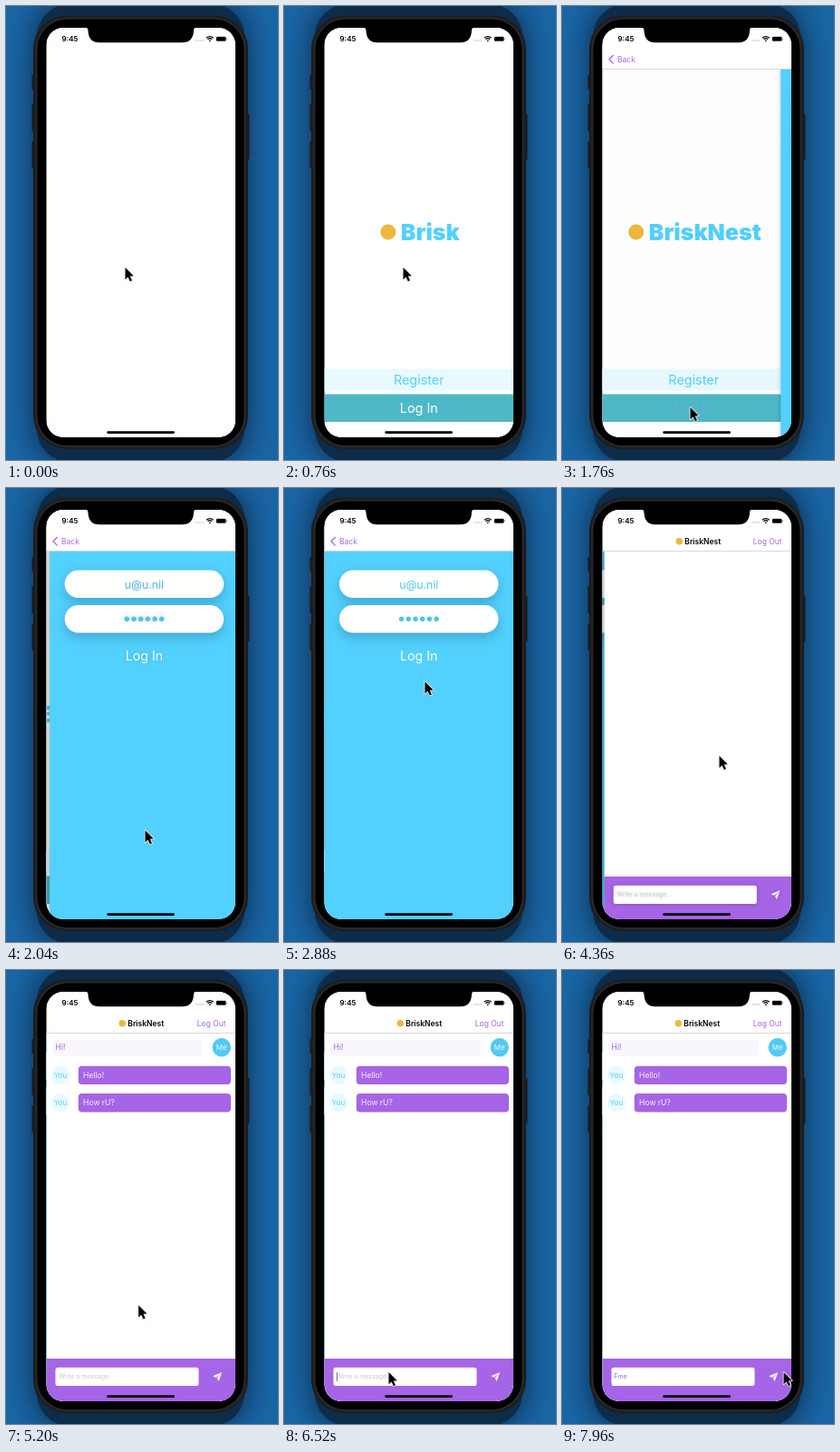
An HTML page with a canvas for the animation above (8 s loop, 300 by 500 pixels).

```html
<!DOCTYPE html>
<html lang="en">
<head>
<meta charset="utf-8">
<title>Chat app demo</title>
<style>
  html, body { margin: 0; width: 100%; height: 100%; overflow: hidden; background: #1a64a4; }
  canvas { display: block; width: 300px; height: 500px; }
</style>
</head>
<body>
<canvas id="stage"></canvas>
<script>
const LOOP = 8000;
const NAME = 'BriskNest';
const EMAIL = 'u@u.nil';
const BLUE = '#53d1fe', PURPLE = '#a664e6', GOLD = '#edb83c';
const SCREEN = { x: 44.5, y: 24, w: 208.5, h: 451 };
const MID = SCREEN.x + SCREEN.w / 2;

const canvas = document.getElementById('stage');
const ratio = window.devicePixelRatio || 1;
canvas.width = 300 * ratio;
canvas.height = 500 * ratio;
const ctx = canvas.getContext('2d');
ctx.scale(ratio, ratio);

const clamp = v => Math.max(0, Math.min(1, v));
const ramp = (t, from, to) => clamp((t - from) / (to - from));
const smooth = p => p * p * (3 - 2 * p);

// Remaining share of a critically damped navigation slide.
function slideLeft(t, start) {
  const x = Math.max(0, t - start) * 0.02;
  return x > 10 ? 0 : (1 + x) * Math.exp(-x);
}

function rect(x, y, w, h, fill, r = 0) {
  ctx.beginPath();
  ctx.roundRect(x, y, w, h, r);
  ctx.fillStyle = fill;
  ctx.fill();
}

function circle(x, y, r, fill) {
  ctx.beginPath();
  ctx.arc(x, y, r, 0, Math.PI * 2);
  ctx.fillStyle = fill;
  ctx.fill();
}

function font(size, weight = 400) {
  ctx.font = `${weight} ${size}px Inter, sans-serif`;
}

function text(str, x, y, size, fill, weight = 400, align = 'left') {
  font(size, weight);
  ctx.textAlign = align;
  ctx.fillStyle = fill;
  ctx.fillText(str, x, y);
}

function polygon(points, fill) {
  ctx.beginPath();
  points.forEach(([x, y]) => ctx.lineTo(x, y));
  ctx.closePath();
  ctx.fillStyle = fill;
  ctx.fill();
}

function shadow(color, blur, dy = 0) {
  ctx.shadowColor = color;
  ctx.shadowBlur = blur * ratio;
  ctx.shadowOffsetY = dy * ratio;
}

function isolated(draw, dx = 0, alpha = 1) {
  ctx.save();
  ctx.translate(dx, 0);
  ctx.globalAlpha *= alpha;
  draw();
  ctx.restore();
}

function drawPhone() {
  rect(0, 0, 300, 500, '#1a66a6');
  isolated(() => {
    shadow('rgba(0,8,20,.72)', 34);
    rect(34, -2, 229, 504, '#0c2c4a', 36);
  });
  const button = '#1b1c1f';
  [[28.5, 76, 16], [28.5, 108, 30], [28.5, 149, 30], [265, 119, 50]]
    .forEach(([x, y, h]) => rect(x, y, 3.5, h, button, 1));
  rect(30, 10.5, 237, 477.5, '#1d1d1f', 37);
  rect(32.5, 12.5, 232, 473.5, '#29292b', 35);
  rect(34.5, 14.5, 228, 469.5, '#000', 33);
}

function drawNotch() {
  ctx.beginPath();
  ctx.moveTo(86, 23);
  ctx.quadraticCurveTo(90.5, 23.5, 90.5, 27);
  ctx.quadraticCurveTo(91, 40.3, 103, 40.3);
  ctx.lineTo(194, 40.3);
  ctx.quadraticCurveTo(206.5, 40.3, 207, 27);
  ctx.quadraticCurveTo(207, 23.5, 211, 23);
  ctx.closePath();
  ctx.fillStyle = '#000';
  ctx.fill();
}

function drawStatus() {
  text('9:45', 61.5, 39, 8, '#000', 600);
  for (let i = 0; i < 4; i++) circle(210 + i * 2.5, 38, 0.75, '#b5b5b5');
  ctx.strokeStyle = '#000';
  ctx.lineWidth = 1.3;
  for (const r of [3.2, 5.4]) {
    ctx.beginPath();
    ctx.arc(224.8, 39, r, -Math.PI * 0.75, -Math.PI * 0.25);
    ctx.stroke();
  }
  polygon([[224.8, 39.4], [223.5, 37.7], [226.1, 37.7]], '#000');
  rect(231.5, 33.4, 11.4, 5.6, '#aaa', 1.6);
  rect(232, 33.9, 10.4, 4.6, '#000', 1.2);
  rect(243.4, 35.2, 0.9, 2, '#999', 0.4);
}

function drawTitle(count) {
  if (count < 1) return;
  font(25, 900);
  const shown = NAME.slice(0, count - 1);
  const width = ctx.measureText(shown).width;
  const left = MID + 1 - (23 + width) / 2;
  circle(left + 9, 249, 8.5, GOLD);
  text(shown, left + 23, 258, 25, BLUE, 900);
}

function drawWelcome(t) {
  rect(SCREEN.x, SCREEN.y, SCREEN.w, SCREEN.h, '#fff');
  isolated(() => {
    drawTitle(Math.floor((t - 240) / 100) + 1);
    rect(SCREEN.x, 399.5, SCREEN.w, 24, '#e9faff');
    text('Register', MID, 416.5, 14.4, BLUE, 400, 'center');
    rect(SCREEN.x, 427.5, SCREEN.w, 30.5, '#4fb8c7');
    const pressed = t > 1620;
    text('Log In', MID, 447.5, 14.4, pressed ? 'rgba(110,178,212,.7)' : '#fff', 400, 'center');
  }, 0, ramp(t, 100, 320));
}

function drawLogin(t) {
  rect(SCREEN.x, 69, SCREEN.w, 407, BLUE);
  for (const y of [90.5, 129]) {
    isolated(() => {
      shadow('rgba(30,95,125,.36)', 13, 5);
      rect(61, y, 175.5, 30.5, '#fff', 15.2);
    });
  }
  text(EMAIL, MID, 111, 12.3, '#53c4ee', 400, 'center');
  for (let i = 0; i < 6; i++) circle(129.6 + i * 7.7, 144.3, 2.7, '#50c3ee');
  const press = t > 3080 && t < 3240 ? 0.3 : 1;
  isolated(() => text('Log In', MID, 190, 14.2, '#fff', 400, 'center'), 0, press);
}

function drawMessage(row, words, mine) {
  const y = 75.5 + row * 30.4;
  const avatarX = mine ? 237.8 : 60;
  circle(avatarX, y + 9.8, 10.2, mine ? '#52c9f5' : '#e9faff');
  text(mine ? 'Me' : 'You', avatarX, y + 12.9, 8, mine ? '#e9faff' : BLUE, 400, 'center');
  if (mine) rect(51, y + 1.5, 166, 18, '#f9f6fe', 4);
  else rect(79.8, y - 0.2, 168.2, 20.4, PURPLE, 4);
  text(words, mine ? 54.5 : 85, y + 12.8, 8.6, mine ? PURPLE : '#f6f0fe');
}

function drawInput(t) {
  rect(SCREEN.x, 428, SCREEN.w, 48, PURPLE);
  rect(54.5, 437.8, 158, 20.2, '#fff', 2.5);
  const typed = 'Fine'.slice(0, [6640, 6880, 7040, 7200].filter(at => t >= at).length);
  if (typed) text(typed, 57.6, 450.3, 7, PURPLE);
  else text('Write a message...', 58, 450.3, 7, '#c9c7cd');
  if (t >= 6500 && t < 7480) {
    font(7);
    rect(58 + (typed ? ctx.measureText(typed).width : 0), 443, 0.9, 10, '#686579');
  }
  polygon([[238.2, 443], [228.2, 447.3], [231.6, 448.8], [236, 445.2]], '#fff');
  polygon([[238.2, 443], [232.7, 449.4], [234.6, 453]], '#fff');
}

function drawChat(t) {
  rect(SCREEN.x, 69, SCREEN.w, 407, '#fff');
  if (t >= 4680) {
    drawMessage(0, 'Hi!', true);
    drawMessage(1, 'Hello!', false);
    drawMessage(2, 'How rU?', false);
  }
  drawInput(t);
}

function drawPush(left, under, over) {
  const w = SCREEN.w;
  isolated(under, -0.3 * w * (1 - left));
  if (left < 0.002) return isolated(over);
  rect(SCREEN.x, 69, w, 407, `rgba(0,0,0,${0.12 * (1 - left)})`);
  isolated(() => {
    shadow('rgba(0,0,0,.2)', 5);
    over();
  }, w * left);
}

function drawNav(chatLeft) {
  rect(SCREEN.x, SCREEN.y, SCREEN.w, 45.5, '#fff');
  rect(SCREEN.x, 69, SCREEN.w, 0.8, '#cdcdd0');
  const fade = clamp(1 - (1 - chatLeft) * 1.8);
  isolated(() => {
    ctx.strokeStyle = PURPLE;
    ctx.lineWidth = 1.3;
    ctx.lineCap = ctx.lineJoin = 'round';
    ctx.beginPath();
    ctx.moveTo(56.3, 54.5);
    ctx.lineTo(52, 58.8);
    ctx.lineTo(56.3, 63.1);
    ctx.stroke();
    text('Back', 61, 62, 8.5, PURPLE);
  }, 0, fade);
  isolated(() => {
    circle(128.3, 58.8, 3.8, GOLD);
    text(NAME, 134.3, 62, 8.5, '#000', 600);
  }, 90 * chatLeft, 1 - chatLeft);
  isolated(() => text('Log Out', 242.6, 62, 8.5, PURPLE, 400, 'right'), 0, 1 - chatLeft);
}

// Pointer stops: time, x, y.
const POINTER = [
  [0, 131, 288], [840, 131, 288], [1600, 141, 442], [1800, 141, 442],
  [2040, 153, 377], [2280, 159, 334], [2460, 159, 334], [3040, 154, 186],
  [3480, 154, 186], [3880, 180, 228], [4360, 173, 295], [4520, 172, 306],
  [4660, 172, 306], [5800, 115, 443], [7420, 115, 443], [7720, 277, 438],
  [7960, 244, 443], [8000, 244, 443]
];

function drawPointer(t) {
  const i = Math.max(1, POINTER.findIndex(stop => stop[0] > t));
  const [t0, x0, y0] = POINTER[i - 1], [t1, x1, y1] = POINTER[i];
  const p = smooth(ramp(t, t0, t1));
  ctx.save();
  ctx.translate(x0 + (x1 - x0) * p, y0 + (y1 - y0) * p);
  shadow('rgba(0,0,0,.3)', 2, 1);
  const arrow = [[0.5, 0], [0.5, 13.2], [3.5, 10.4], [5.8, 15.2], [8, 14.2], [5.8, 9.5], [9.8, 9.3]];
  polygon(arrow, '#000');
  shadow('transparent', 0);
  ctx.strokeStyle = '#fff';
  ctx.lineWidth = 1.6;
  ctx.lineJoin = 'round';
  ctx.stroke();
  polygon(arrow, '#000');
  ctx.restore();
}

function drawScreen(t) {
  const loginLeft = slideLeft(t, 1742), chatLeft = slideLeft(t, 4035);
  ctx.save();
  ctx.beginPath();
  ctx.roundRect(SCREEN.x, SCREEN.y, SCREEN.w, SCREEN.h, 19);
  ctx.clip();
  rect(SCREEN.x, SCREEN.y, SCREEN.w, SCREEN.h, '#fff');
  if (t < 1742) drawWelcome(t);
  else {
    if (t < 4035) drawPush(loginLeft, () => drawWelcome(t), () => drawLogin(t));
    else drawPush(chatLeft, () => drawLogin(t), () => drawChat(t));
    drawNav(chatLeft);
  }
  drawStatus();
  rect(111.3, 468.3, 74.7, 2.6, '#000', 1.3);
  ctx.restore();
}

function render(t) {
  drawPhone();
  drawScreen(t);
  drawNotch();
  drawPointer(t);
}

const began = performance.now();
function tick() {
  render((performance.now() - began) % LOOP);
  requestAnimationFrame(tick);
}
tick();
</script>
</body>
</html>
```
